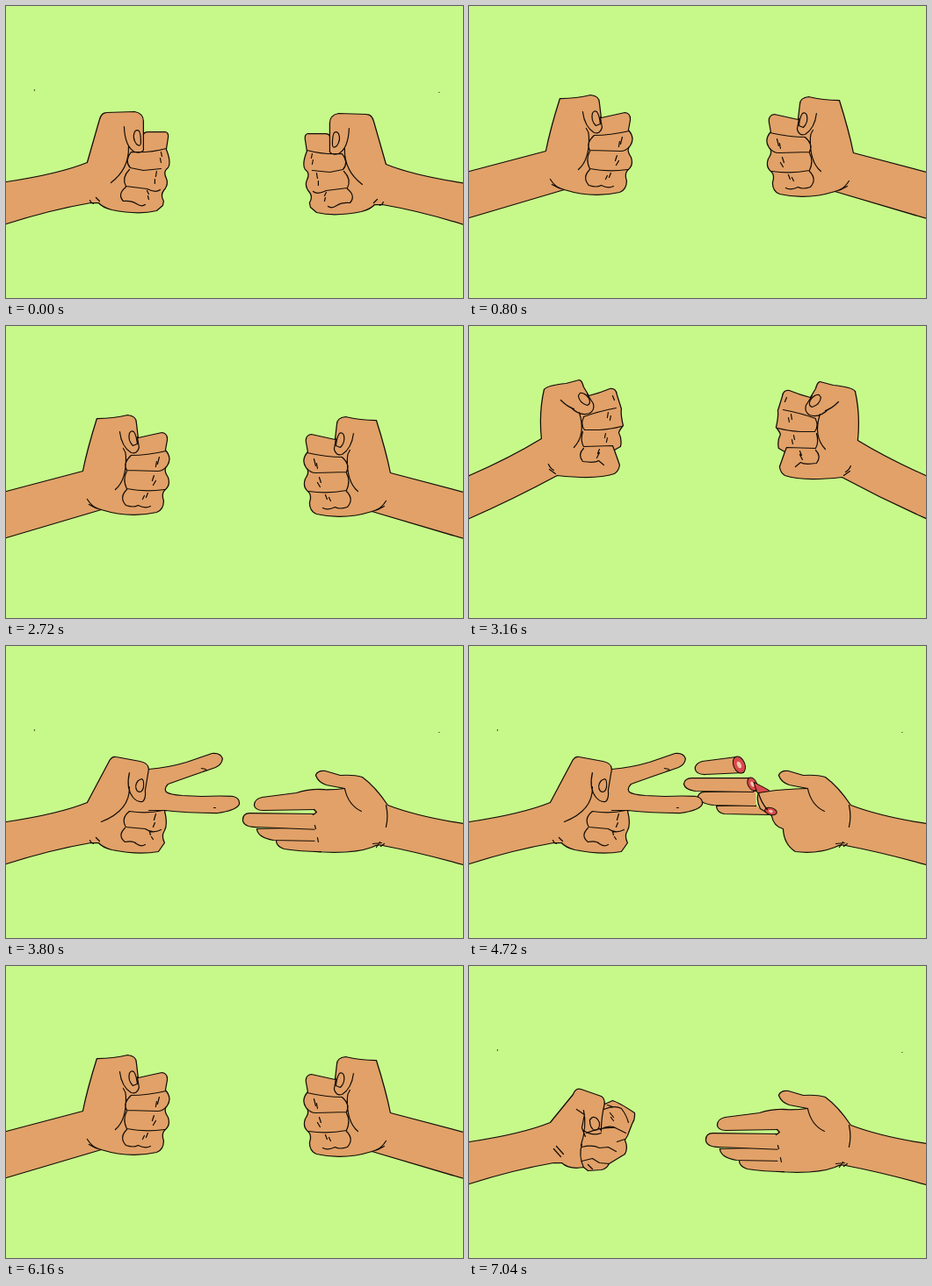
These frames come from a looping animation (520x333 px, 8000 ms). An HTML page:

```html
<!DOCTYPE html>
<html lang="en">
<head>
<meta charset="utf-8">
<title>Rock, paper, scissors</title>
<style>
  html, body { margin: 0; width: 100%; height: 100%; overflow: hidden; background: #c7f98a; }
  svg { display: block; width: 100%; height: 100%; }
  path, ellipse { stroke: #120c06; stroke-width: 1.25; stroke-linejoin: round; stroke-linecap: round; }
  .skin { fill: #e1a168; }
  .line { fill: none; stroke-width: 1.2; }
  .fill { fill: #e1a168; stroke: none; }
  .cut { fill: #d94a4c; stroke-width: 1; }
  .bone { fill: #f3c3ae; stroke: none; }
</style>
</head>
<body>
<svg viewBox="0 0 520 333" preserveAspectRatio="none"><g id="stage" transform="translate(.4 .5)"></g></svg>
<script>
const LOOP = 8000, STEP = 40;
const stage = document.getElementById('stage');

// Left-hand drawings; the right side mirrors them.
const armTop = 'M-90,216 L0,200 Q60,191 92,178 ';
const armEnd = 'Q150,238 120,232 Q109,229 105,224 L96,224 Q50,232 0,248 L-90,274';
const wrist = 'M95,221 Q96,224 99,225 M102,218 L106,222 ';
const lowFingers = 'M178,187 Q160,191 140,188 Q130,196 136,206 L158,208 Q166,214 176,209 ' +
  'M135,207 Q126,216 135,223 Q144,221 148,225 Q153,229 158,226 ' +
  'M170,191 L168,198 M169,201 L167,206 M163,211 L164,215 M165,217 L167,220 ';

const rest = {
  out: armTop + 'L106,129 Q108,121 114,121 L146,120 Q156,122 156,131 L156,146 Q157,143 161,143 L181,143 ' +
    'Q185,144 184,150 L182,163 Q188,178 184,184 Q178,188 182,196 Q185,203 179,210 Q175,215 179,222 L178,227 L171,233 ' + armEnd,
  inner: wrist + 'M134,137 Q135,160 146,166 Q153,168 156,164 L156,146 ' +
    'M146,143 Q143,150 148,157 Q153,161 153,155 Q153,145 151,142 Q148,140 146,143 ' +
    'M139,160 Q140,185 119,201 M182,162 Q165,167 142,166 Q134,176 141,184 L156,187 Q166,186 176,185 ' +
    'M140,186 Q131,195 136,205 L160,208 Q170,213 175,209 M136,206 Q126,214 133,222 Q142,221 148,225 Q154,229 158,226 ' +
    'M176,166 L177,171 M175,173 L176,178 M171,188 L170,194 M169,197 L169,202 M160,210 L162,214 M161,216 L162,220'
};

const mid = {
  out: 'M-90,211 L0,188 L87,165 Q92,140 103,105 Q122,105 138,101 Q148,102 148,110 L150,127 L177,121 Q184,122 183,130 L181,141 ' +
    'Q189,150 183,159 Q178,163 184,172 Q187,181 181,186 Q176,190 179,199 Q179,209 171,212 Q140,219 108,209 L0,241 L-90,268',
  inner: 'M92,197 Q97,205 103,207 M94,203 Q100,207 108,209 M129,120 Q131,137 142,144 Q149,146 151,138 L149,126 ' +
    'M140,122 Q138,130 144,136 L149,134 Q148,124 145,120 Q142,118 140,122 M133,139 Q136,143 136,148 Q137,175 124,186 ' +
    'M182,142 Q160,147 142,147 Q132,156 137,164 L172,165 Q178,165 182,160 M137,165 Q132,175 137,185 Q158,189 180,186 ' +
    'M137,186 Q128,195 136,204 Q145,207 150,204 Q158,208 164,205 ' +
    'M174,149 L172,157 M171,154 L170,160 M168,170 L166,176 M170,176 L167,181 M161,190 L159,195 M157,193 L155,197'
};

const top1 = {
  out: 'M-90,216 L0,170 Q46,150 82,128 Q79,98 85,72 Q89,67 110,65 L125,61 Q128,61 130,69 L136,79 Q148,76 160,71 ' +
    'Q167,70 168,78 L173,94 Q172,100 175,113 Q171,118 170,121 Q174,129 172,137 L165,141 L171,158 Q170,165 165,168 ' +
    'Q145,175 100,170 Q50,197 0,219 L-90,262',
  inner: 'M90,157 Q92,162 96,164 M91,163 L98,168 M104,84 Q112,92 119,94 M115,92 Q126,103 137,99 Q143,95 141,88 L134,77 ' +
    'M124,79 Q125,87 134,90 Q139,88 136,82 Q131,75 126,76 Z M125,98 Q133,123 119,138 M130,103 Q146,97 167,93 ' +
    'M130,104 Q126,111 131,118 L148,118 Q162,117 173,114 M129,120 Q126,130 130,137 L163,136 L165,141 ' +
    'M130,139 Q123,146 129,154 Q143,156 147,153 L153,158 ' +
    'M163,79 L165,84 M158,98 L157,104 M161,102 L160,107 M155,122 L154,127 M157,127 L156,132 M148,140 L146,145 L148,144 L145,150'
};

const smear = {
  out: 'M-90,217 L0,175 Q45,155 78,138 Q85,136 88,149 Q87,130 86,114 Q79,90 84,76 Q89,70 112,66 Q118,66 122,72 L139,98 ' +
    'Q139,90 133,82 Q142,80 148,73 Q157,69 158,72 L160,82 L158,75 Q172,130 171,190 Q174,217 170,230 ' +
    'Q168,236 163,235 Q130,232 100,219 Q50,229 0,242 L-90,264',
  inner: ''
};

const crushed = {
  out: armTop + 'L118,146 Q121,138 127,140 L150,148 Q154,150 154,157 L163,153 Q170,155 188,167 Q189,174 185,180 ' +
    'L180,193 L177,198 Q181,207 177,214 L159,225 Q156,231 150,232 L135,233 L130,229 Q114,232 105,224 L96,224 Q50,232 0,248 L-90,274',
  inner: 'M96,208 L104,217 M99,205 L107,214 M122,163 L131,169 L128,184 L132,194 M130,164 Q134,182 127,204 ' +
    'M137,175 Q137,185 143,187 Q149,186 148,178 Q145,171 140,172 Z M154,156 Q150,172 150,188 M130,187 Q140,194 150,190 ' +
    'M153,163 Q165,158 173,162 Q179,170 181,178 M149,186 Q160,180 168,185 L178,190 M133,190 Q150,183 164,184 ' +
    'M128,206 Q140,203 148,207 L158,206 L167,211 M128,203 Q124,216 130,229 M128,222 L140,219 L148,224 L159,225 ' +
    'M160,167 L164,172 M161,172 L164,176 M157,158 L163,160 M168,200 L177,197 M135,226 L140,231'
};

// Index and middle finger of the scissors; same commands, so they can blend.
const blades = {
  open: 'Q185,138 205,132 L234,122 Q244,121 246,128 Q245,135 238,138 L212,147 Q195,153 184,157 Q179,162 182,166 ' +
    'Q186,169 200,170 L222,171 Q245,170 258,171 Q266,173 265,180 Q262,187 240,190 Q205,190 180,187 ',
  bent: 'Q185,139 204,133 L240,136 Q250,138 248,146 Q245,152 235,153 L206,150 Q192,153 183,157 Q178,162 182,166 ' +
    'Q186,169 196,170 L214,171 Q235,160 247,156 Q257,157 256,166 Q253,177 222,190 Q205,190 180,187 ',
  shut: 'Q188,141 208,142 L243,145 Q252,147 252,153 Q250,159 243,160 L214,159 Q196,159 186,160 Q181,163 184,165 ' +
    'Q188,166 200,166 L222,163 Q245,161 257,161 Q265,163 264,170 Q261,177 240,182 Q205,190 180,187 '
};

const mix = (a, b, k) => {
  const to = b.match(/-?[\d.]+/g);
  let i = 0;
  return a.replace(/-?[\d.]+/g, n => (+n + (to[i++] - n) * k).toFixed(1));
};

const scissors = (shape, k) => ({
  out: armTop + 'L118,129 Q121,125 125,126 L152,131 Q162,133 162,140 ' + mix(blades.open, blades[shape], k) +
    'Q184,203 180,210 Q176,216 180,224 L173,234 ' + armEnd,
  inner: wrist + 'M140,144 Q136,162 144,172 Q149,178 155,177 Q159,174 158,164 L162,140 ' +
    'M150,153 Q145,159 149,165 Q154,168 156,161 Q157,152 154,151 Z M140,160 Q141,187 108,200 M162,187 L182,187 ' + lowFingers +
    (shape === 'bent' && k > .5 ? 'M203,145 L204,150' : k < .2 ? 'M222,139 L227,140 M225,142 L229,141 M236,184 L238,184' : '')
});

const path = name => d => `<path class="${name}" d="${d}"/>`;
const skin = path('skin'), line = path('line'), fill = path('fill');
const group = (transform, body) => `<g transform="${transform}">${body}</g>`;
const hand = p => skin(p.out) + line(p.inner);
const mirror = p => group('translate(524 2) scale(-1 1)', hand(p));
const dot = (x, y, r) => `<circle cx="${x}" cy="${y}" r="${r}" fill="#120c06"/>`;
const specks = dot(32, 95.5, .7) + dot(492.5, 98, .6);
const wound = (x, y, rx, ry, turn) => group(`translate(${x} ${y}) rotate(${turn})`,
  `<ellipse class="cut" rx="${rx}" ry="${ry}"/><ellipse class="bone" rx="${rx * .35}" ry="${ry * .4}"/>`);

// Open right hand.
const palmTop = 'M572,212 L520,202 Q468,194 434,181 Q420,160 405,149 Q395,146 380,147 L363,142 Q354,141 352,147 Q355,155 364,158 L385,162 ';
const palmEnd = 'Q395,237 416,229 Q422,225 428,227 Q470,235 520,249 L572,262';
const palmLines = 'M385,162 Q389,181 404,188 M432,181 Q435,194 432,206 M417,225 L427,224 M421,229 L425,223 M426,228 L430,225';
const fingers = [
  'M358,234 Q335,234 316,231 Q307,228 307,221 L360,216',
  'M358,222 L304,221 Q286,218 285,208 L358,206',
  'M358,209 L284,206 Q270,206 269,198 Q269,190 277,190 L352,191',
  'M352,186 L292,187 Q283,187 282,181 Q282,174 291,172 L330,167 Q345,162 362,163'
];
const paper = () => fingers.map(skin).join('') +
  fill(palmTop + 'L351,164 L351,233 ' + palmEnd) +
  line(palmTop + 'Q372,164 354,163 M350,234 ' + palmEnd) +
  line(palmLines + ' M350,186 L353,189 L349,192 M351,204 L352,208 M354,218 L355,223');

const stump = () => path('cut')('M324,155 Q330,158 341,164 L340,169 L328,167 Z') +
  skin(palmTop + 'Q354,163 342,165 L329,167 Q326,175 331,185 L344,193 Q346,205 357,208 Q358,226 371,234 ' + palmEnd) +
  line(palmLines) + wound(343, 188, 7, 4, 15) + line('M329,167 Q332,178 339,186');

const pieces = [
  { d: 'M342,192 L290,191 Q282,190 281,182 L326,181', cx: 312, cy: 186, vx: 10, vy: 30, spin: 20 },
  { d: 'M326,182 L278,181 Q261,179 260,171 Q262,165 270,166 L326,165', cx: 294, cy: 173, vx: -14, vy: 8, spin: -28 },
  { d: 'M323,166 L258,165 Q246,164 244,157 Q245,150 253,150 L319,150', cx: 284, cy: 158, vx: -30, vy: -25, spin: 35, end: [322, 157, 5, 8, -25] },
  { d: 'M312,144 L268,146 Q258,146 257,140 Q256,134 265,131 L304,126', cx: 285, cy: 136, vx: 16, vy: -60, spin: -45, end: [307, 135, 6.5, 10, -22] }
];

// Severed fingers: shared throw, then each one spreads and spins.
const flying = u => pieces.map(p => {
  const w = Math.max(0, u - 1);
  const x = 25 - 25 * u + p.vx * w;
  const y = 40 - 67 * u + 27 * u * u + p.vy * w;
  return group(`translate(${x} ${y}) rotate(${p.spin * w} ${p.cx} ${p.cy})`,
    skin(p.d) + (p.end ? wound(...p.end) : ''));
}).join('');

// Fist pumps: rise, top, wind-up, smear, landing; the last wind-up is held.
function pump(p) {
  if (p >= 1040) return p < 1120 ? 'wind' : 'smear';
  const q = (p - 80) % 360;
  return p < 80 ? 'rest' : q < 80 ? 'mid' : q < 160 ? 'top' : q < 240 ? 'wind' : q < 280 ? 'smear' : 'rest';
}

function fists(name) {
  const pose = { rest, mid, top: top1, wind: top1, smear }[name];
  const body = hand(pose) + mirror(pose);
  if (name === 'wind') return group('translate(0 -4)', body);
  return (name === 'rest' ? specks : '') + body;
}

function smashed(t) {
  const s = t - 1840;
  const k = s < 0 ? 0 : 1 - Math.sin(s / 28) * .35 * Math.max(0, 1 - s / 280);
  const far = 1 + Math.max(0, s) / 450;
  const chips = s < 0 || s >= 280 ? '' :
    [[193, 121.5, 1.3], [237.5, 189, 1.7], [214.5, 204, .9]].map(([x, y, r]) =>
      dot(215 + (x - 215) * far, 160 + (y - 160) * far, r)).join('');
  return specks + mirror(rest) + hand(scissors('bent', k)) + chips;
}

function snipped(t) {
  const a = (t - 4280) / 440, u = (t - 4600) / 120;
  const active = a > 0 && a < 1;
  const dx = active ? 62 * Math.sin(Math.PI * a) : 0;
  const k = active ? Math.max(0, Math.sin(Math.PI * (a * 1.6 - .45))) : 0;
  const shake = t >= 5120 && t < 5400 ? Math.sin(t / 25) * 1.2 : 0;
  const right = u < 0 ? paper() : (u < 4.1 ? flying(u) : '') + group(`translate(${shake} 0)`, stump());
  return specks + right + group(`translate(${dx} 0)`, hand(scissors('shut', k)));
}

function wrapped(t) {
  const turn = t < 6800 || t >= 7040 ? 0 : t < 6880 ? -12 : t < 6920 ? 9 : t < 6960 ? -6 : 3;
  return specks + paper() + group(`rotate(${turn} 0 224)`, hand(t < 6880 ? rest : crushed));
}

function draw(t) {
  const round = t < 2720 ? 0 : t < 5440 ? 1 : 2;
  const p = t - [0, 2640, 5360][round];
  return p < 1160 ? fists(pump(p)) : [smashed, snipped, wrapped][round](t);
}

let last = -1;
const start = performance.now();
function tick() {
  const t = Math.floor((performance.now() - start) % LOOP / STEP) * STEP;
  if (t !== last) stage.innerHTML = draw(last = t);
  requestAnimationFrame(tick);
}
tick();
</script>
</body>
</html>
```
